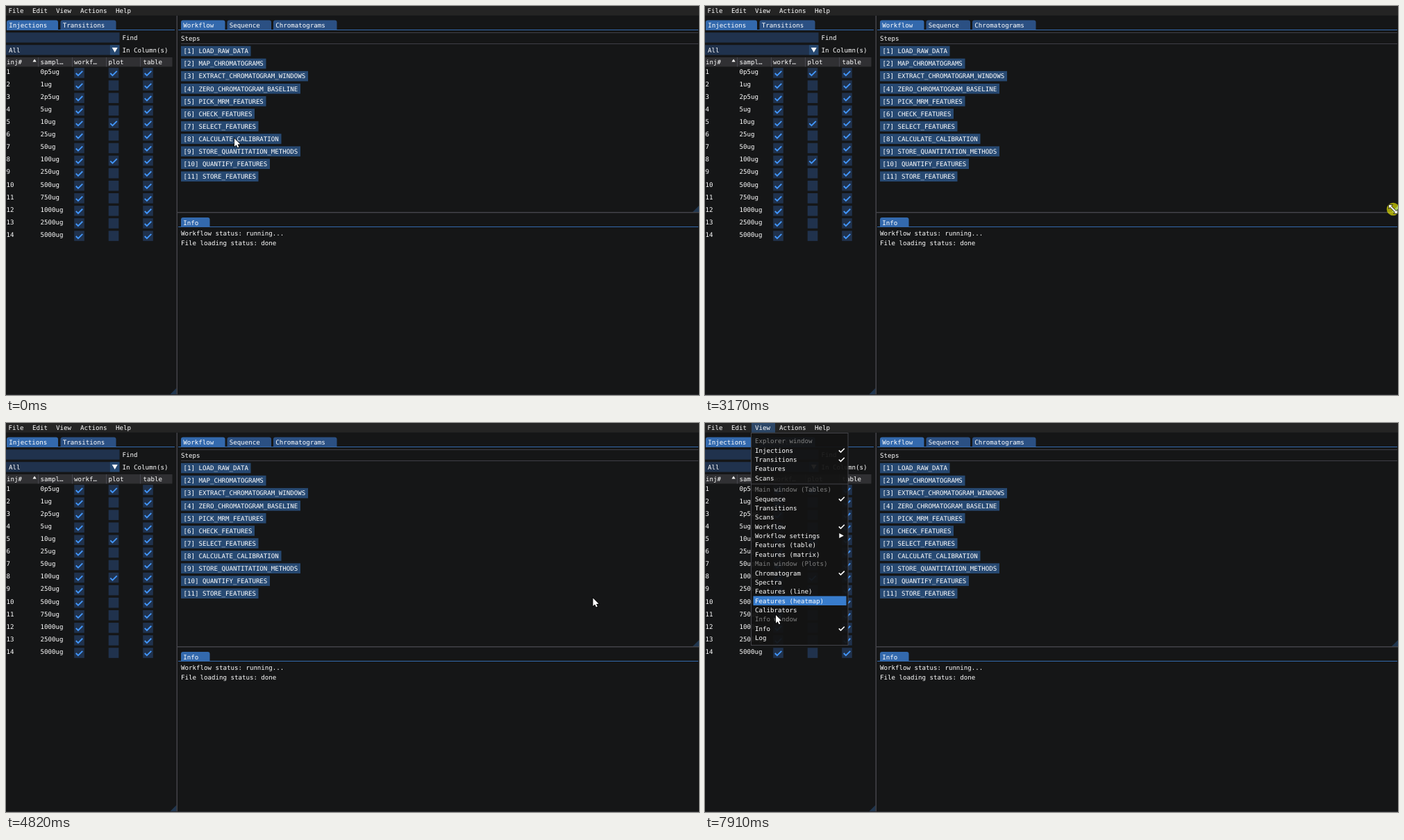
These frames come from a looping animation (998x561 px, 7.99 s). An HTML page with a canvas:

```html
<!DOCTYPE html>
<html lang="en">
<head>
<meta charset="utf-8">
<title>Workflow window</title>
<style>
html, body { margin: 0; width: 100%; height: 100%; overflow: hidden; background: #151617; }
canvas { display: block; }
</style>
</head>
<body>
<canvas id="stage" width="998" height="561"></canvas>
<script>
const LOOP = 7990, W = 998, H = 561, CHAR = 5.5, ROW = 18.08, LINE = 13.36;
const ctx = document.getElementById('stage').getContext('2d');

const BG = '#151617', BORDER = '#434349', WHITE = '#fff', GREY = '#808080';
const BUTTON = '#274972', FRAME = '#20324d', TAB = '#2b5083', TAB_ON = '#3369ad', MARK = '#4296fa';
const accent = a => `rgba(66,150,250,${a})`;

// Bursts of motion: first step, last step, number of steps
const bursts = [[0, 0, 1], [680, 1080, 6], [1380, 2160, 11], [2240, 2390, 3], [2560, 2790, 3],
  [3020, 3020, 1], [3170, 3170, 1], [3490, 3490, 1], [3640, 4420, 11], [4500, 4650, 3],
  [4820, 5130, 5], [5430, 6200, 11], [6520, 6520, 1], [7300, 7910, 9]];

const cursorPath = [[600, 329, 191], [760, 420, 207], [920, 700, 255], [1080, 853, 281],
  [1300, 853, 281], [1540, 890, 295], [1850, 942, 302], [2160, 985, 293], [2390, 988, 292],
  [2790, 991, 293], [3560, 991, 293], [4180, 990, 312], [4420, 990, 317], [4740, 990, 317],
  [5130, 285, 2], [5350, 285, 2], [5590, 220, 3], [5740, 140, 5], [5890, 92, 6], [6200, 88, 6],
  [7220, 88, 6], [7300, 88, 25], [7600, 140 - 44, 140], [7790, 100, 254], [7910, 102, 277]];
const dividerPath = [[3560, 0], [4180, 15], [4420, 19], [4650, 25]];

const menus = [['File', 4], ['Edit', 38.5], ['View', 72.5], ['Actions', 107.5], ['Help', 158.5]];
// Prefixes: # heading, + ticked, > submenu
const viewItems = ['#Explorer window', '+Injections', '+Transitions', 'Features', 'Scans',
  '#Main window (Tables)', '+Sequence', 'Transitions', 'Scans', '+Workflow', '>Workflow settings',
  'Features (table)', 'Features (matrix)', '#Main window (Plots)', '+Chromatogram', 'Spectra',
  'Features (line)', 'Features (heatmap)', 'Calibrators', '#Info window', '+Info', 'Log'];
const samples = ['0p5', '1', '2p5', '5', '10', '25', '50', '100', '250', '500', '750', '1000', '2500', '5000'];
const steps = ['LOAD_RAW_DATA', 'MAP_CHROMATOGRAMS', 'EXTRACT_CHROMATOGRAM_WINDOWS',
  'ZERO_CHROMATOGRAM_BASELINE', 'PICK_MRM_FEATURES', 'CHECK_FEATURES', 'SELECT_FEATURES',
  'CALCULATE_CALIBRATION', 'STORE_QUANTITATION_METHODS', 'QUANTIFY_FEATURES', 'STORE_FEATURES'];

function snap(t) {
  const [a, b, n] = bursts.filter(s => s[0] <= t).pop();
  if (n === 1) return a;
  const d = (b - a) / (n - 1);
  return a + Math.min(n - 1, Math.floor((t - a) / d + 0.15)) * d;
}

function along(path, t) {
  const i = path.findIndex(p => p[0] > t);
  if (i === 0) return path[0].slice(1);
  if (i < 0) return path[path.length - 1].slice(1);
  const p = path[i - 1], q = path[i], k = (t - p[0]) / (q[0] - p[0]);
  return p.slice(1).map((v, j) => v + (q[j + 1] - v) * k);
}

function rect(x, y, w, h, color) {
  ctx.fillStyle = color;
  ctx.fillRect(x, y, w, h);
}

function text(s, x, middle, color = WHITE) {
  ctx.fillStyle = color;
  ctx.fillText(s, x, middle + 3.3);
}

function shape(points, color, outline) {
  ctx.beginPath();
  points.forEach(([x, y]) => ctx.lineTo(x, y));
  ctx.closePath();
  if (outline) {
    ctx.strokeStyle = outline;
    ctx.lineWidth = 1.4;
    ctx.stroke();
  }
  ctx.fillStyle = color;
  ctx.fill();
}

function tick(x, y, size, color) {
  const u = size / 3;
  ctx.beginPath();
  ctx.moveTo(x - 1.5 * u, y);
  ctx.lineTo(x - 0.5 * u, y + u);
  ctx.lineTo(x + 1.5 * u, y - u);
  ctx.strokeStyle = color;
  ctx.lineWidth = size / 5;
  ctx.stroke();
}

function tab(label, x, y, w, on) {
  ctx.fillStyle = on ? TAB_ON : TAB;
  ctx.beginPath();
  ctx.roundRect(x, y, w, 14, [3, 3, 0, 0]);
  ctx.fill();
  text(label, x + 3.3, y + 7.3);
}

function grip(x, y, color) {
  shape([[x, y], [x, y - 9], [x - 9, y]], color);
}

function checkbox(x, y, on) {
  rect(x - 7.3, y - 7.3, 14.6, 14.6, FRAME);
  if (on) tick(x, y + 0.5, 9.5, MARK);
}

function leftPane() {
  tab('Injections', 1, 20.5, 74, true);
  tab('Transitions', 78.5, 20.5, 80, false);
  rect(1, 34, 242, 1, TAB_ON);
  rect(0, 38.3, 163.5, 14.4, FRAME);
  text('Find', 167.5, 45.5);
  rect(0, 56.2, 149.5, 14.4, FRAME);
  rect(149.5, 56.2, 14, 14.4, BUTTON);
  shape([[152.7, 60], [160.7, 60], [156.7, 67]], WHITE);
  text('All', 4, 63.5);
  text('In Column(s)', 167.5, 63.5);

  rect(0, 74, 239.5, 13.5, '#303033');
  [46, 95, 144, 193].forEach(x => rect(x, 74, 1, 13.5, '#47474f'));
  [['inj#', 1], ['sampl…', 49.5], ['workf…', 98], ['plot', 147.5], ['table', 197.5]]
    .forEach(([s, x]) => text(s, x, 81));
  shape([[38.5, 80.5], [43.7, 80.5], [41.1, 76.5]], WHITE);

  samples.forEach((s, i) => {
    const y = 94.5 + ROW * i;
    text(i + 1, 0.5, y);
    text(s + 'ug', 49.5, y);
    checkbox(105.5, y + 2, true);
    checkbox(155, y + 2, [0, 4, 7].includes(i));
    checkbox(204.5, y + 2, true);
  });
  grip(245.5, 560, '#20364f');
  rect(245.5, 14, 1.5, H - 14, BORDER);
}

function rightPanes(offset, gripColor) {
  tab('Workflow', 252, 20.5, 63.5, true);
  tab('Sequence', 318.5, 20.5, 63.5, false);
  tab('Chromatograms', 385, 20.5, 91.5, false);
  rect(248, 34, 749, 1, TAB_ON);
  rect(252, 38, 745, 1, '#3f3f47');
  rect(252, 54, 745, 1, '#3f3f47');
  text('Steps', 252, 46.5);
  steps.forEach((name, i) => {
    const label = `[${i + 1}] ${name}`, y = 65 + ROW * i;
    rect(252, y - 7.3, label.length * CHAR + 7, 14.6, BUTTON);
    text(label, 255.5, y);
  });

  const y = 297 + offset;
  grip(998, y, gripColor);
  rect(246, y, W - 246, 1.5, BORDER);
  tab('Info', 252, y + 8, 41.5, true);
  rect(248, y + 21, 749, 1, TAB_ON);
  text('Workflow status: running...', 252, y + 31);
  text('File loading status: done', 252, y + 44.3);
  rect(0, 560, W, 1, '#2b2b30');
}

function menuBar(hx, hy, open) {
  rect(0, 0, W, 13.7, '#242424');
  for (const [name, x] of menus) {
    const left = x - 5.5, width = name.length * CHAR + 12;
    const hover = hy < 13.7 && hx >= left && hx < left + width;
    if (hover || (open && name === 'View')) rect(left, 0, width, 13.7, accent(hover ? 0.8 : 0.31));
    text(name, x - 0.5, 7);
  }
}

function viewMenu(hy) {
  rect(66.5, 14, 139.5, 306.5, 'rgba(20,20,20,.94)');
  ctx.strokeStyle = BORDER;
  ctx.lineWidth = 1;
  ctx.strokeRect(66.5, 14.5, 139.5, 306);
  rect(67, 87.5, 139, 1, BORDER);
  viewItems.forEach((item, i) => {
    const kind = '#+>'.includes(item[0]) ? item[0] : '';
    const y = 26 + LINE * i + (i > 4 ? 3.2 : 0);
    if (kind !== '#' && Math.abs(hy - y) < LINE / 2) rect(69.5, y - 6.7, 134, LINE, accent(0.8));
    text(item.slice(kind.length), 72, y, kind === '#' ? GREY : WHITE);
    if (kind === '+') tick(196.8, y, 8, WHITE);
    if (kind === '>') shape([[193.3, y - 3.8], [193.3, y + 3.2], [199.8, y - 0.3]], WHITE);
  });
}

function pointer(x, y) {
  const outline = [[0, 0], [0, 11.7], [2.7, 9.2], [4.5, 13.2], [6.4, 12.4], [4.6, 8.5], [8.2, 8.3]];
  shape(outline.map(([a, b]) => [x + a, y + b]), WHITE, '#000');
}

function resizer(x, y) {
  const half = [[-6, -6], [-1.5, -6], [-3, -4.5], [4.5, 3], [6, 1.5]];
  const all = [...half, ...half.map(([a, b]) => [-a, -b])];
  shape(all.map(([a, b]) => [x + a, y + b]), WHITE, '#222');
}

function draw(now) {
  const time = now % LOOP, t = snap(time);
  const [x, y] = along(cursorPath, t);
  const [hx, hy] = along(cursorPath, t - 120); // the interface trails the pointer
  const resizing = t >= 2560 && t < 4800, pressed = t >= 3170 && t < 4640;
  const open = t >= 6520;

  ctx.font = '9.14px "DejaVu Sans Mono", monospace';
  ctx.textRendering = 'geometricPrecision';
  rect(0, 0, W, H, BG);
  leftPane();
  rightPanes(along(dividerPath, t)[0], pressed ? accent(0.95) : resizing ? accent(0.67) : '#20364f');
  menuBar(hx, hy, open);
  if (open) viewMenu(hy);

  if (pressed) {
    ctx.fillStyle = 'rgba(255,255,0,.6)';
    ctx.beginPath();
    ctx.arc(x, y, 9.3, 0, 7);
    ctx.fill();
  }
  (resizing ? resizer : pointer)(x, y);
  requestAnimationFrame(() => draw(performance.now()));
}
draw(0);
</script>
</body>
</html>
```
